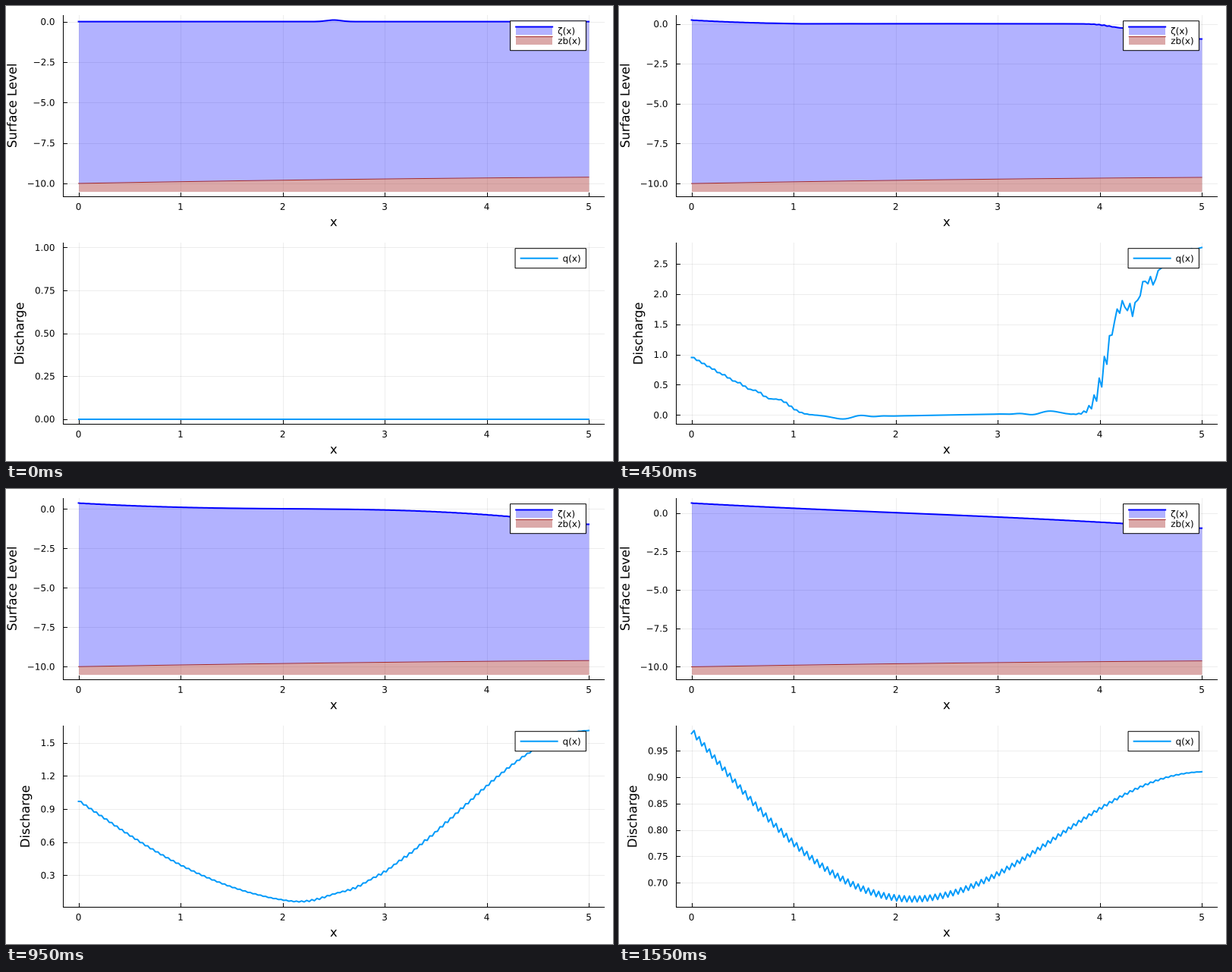
Write a matplotlib script that moves like this. It is 800 by 600 pixels and loops after 1.6 s.

```python
import numpy as np
import matplotlib.pyplot as plt
from matplotlib.animation import FuncAnimation
from matplotlib.patches import PathPatch, Rectangle
from matplotlib.textpath import TextPath
from matplotlib.transforms import Affine2D

W, H, DPI = 800, 600, 100
FRAMES, INTERVAL = 32, 50
PX = 72 / DPI             # points per pixel
SMALL, LARGE = 12, 16.5   # font sizes in pixels
MID = 4.4                 # half the height of a digit
BLUE, BROWN, SKY = "#0000ff", "#a52a2a", "#009afa"
LEFT, RIGHT, TOP, HEIGHT = 75.4, 788.2, 11.7, 239.7
KEY_RIGHT, KEY_TOP, KEY_ROW = 764.45, 19.7, 13

# Shallow water channel: inflow on the left, lowered level on the right
N, GRAVITY, FRICTION = 200, 9.81, 39.0
INFLOW, OUT_LEVEL, FLOOR = 1.0, -1.0, -10.5
SUBSTEPS = 4
x = np.linspace(0, 5, N)
dx = x[1] - x[0]


def bed_level(s):
    return -10 + 0.115 * s - 0.0076 * s ** 2


bed = bed_level(x)
bed_wide = bed_level(np.linspace(-dx, 5 + dx, N + 2))


def pad(a, left, right):
    out = np.empty(a.shape[:-1] + (N + 2,))
    out[..., 1:-1] = a
    out[..., 0], out[..., -1] = left, right
    return out


def diff(a):
    return (a[..., 2:] - a[..., :-2]) / (2 * dx)


def rates(y):
    z, q = y[..., :N], y[..., N:]
    zw = pad(z, z[..., 0], OUT_LEVEL)
    qw = pad(q, INFLOW, q[..., -1])
    depth = zw - bed_wide
    dq = -diff(qw ** 2 / depth) - GRAVITY * (z - bed) * diff(zw) - FRICTION * q
    return np.concatenate([-diff(qw), dq], axis=-1)


def advance(y, dt):
    """One step of a second order L-stable Rosenbrock method."""
    eye, eps, d = np.eye(2 * N), 1e-6, 1 / (2 + np.sqrt(2))
    f0 = rates(y)
    jac = (rates(y + eps * eye) - f0).T / eps
    inv = np.linalg.inv(eye - dt * d * jac)
    k1 = inv @ f0
    k2 = inv @ (rates(y + dt / 2 * k1) - k1) + k1
    return y + dt * k2


def simulate():
    # the time step grows as the waves die out
    knots = [0.5, 1.5, 2.5, 8.5, 13, 17, 23, 27, 31]
    sizes = [0.003, 0.009, 0.0135, 0.0148, 0.0153, 0.0228, 0.033, 0.0525, 0.157]
    mids = np.arange(FRAMES - 1) + 0.5
    steps = np.exp(np.interp(mids, knots, np.log(sizes)))
    y = np.concatenate([0.1 * np.exp(-((x - 2.5) / 0.1) ** 2), np.zeros(N)])
    states = [y]
    for dt in steps:
        for _ in range(SUBSTEPS):
            y = advance(y, dt / SUBSTEPS)
        states.append(y)
    return states


def padded(lo, hi):
    if hi - lo < 1e-12:
        hi = lo + 1
    margin = 0.03 * (hi - lo)
    return lo - margin, hi + margin


def nice_ticks(lo, hi):
    """Tick values and decimals, scored by count, coverage and niceness."""
    best, result = -1, ([], 0)
    span = hi - lo
    order = int(np.floor(np.log10(span)))
    for z in (order, order - 1):
        for base, nice in ((1, 1), (5, .9), (2.5, .5), (2, .7), (3, .2)):
            step = base * 10.0 ** z
            first, last = int(np.ceil(lo / step)), int(np.floor(hi / step))
            count = last - first + 1
            if not 4 <= count <= 8:
                continue
            score = (0.25 * (1 - abs(count - 5) / 5) + (first <= 0 <= last) / 6
                     + 0.5 * span / ((count - 1) * step) + 0.25 * nice)
            if score > best + 1e-9:
                decimals = max(0, -z + (base == 2.5))
                best = score
                result = [i * step for i in range(first, last + 1)], decimals
    return result


def to_x(v):
    return LEFT + (np.asarray(v) + 0.15) / 5.3 * (RIGHT - LEFT)


def line(xs, ys, color="black", width=1.0, z=1, **kw):
    ax.plot(xs, ys, color=color, lw=width * PX, zorder=z, **kw)


def text(px, py, s, size=SMALL, align=0.5, angle=0):
    """Draw s on the baseline py and return its width."""
    path = TextPath((0, 0), s, size=size)
    ink = path.get_extents()
    place = (Affine2D().translate(-ink.x0 - align * ink.width, 0)
             .rotate_deg(angle).scale(1, -1).translate(px, py))
    ax.add_patch(PathPatch(path, fc="black", lw=0, zorder=7,
                           transform=place + ax.transData))
    return ink.width


def panel(top, limits, name):
    """Draw grid, axes and labels; return the value-to-pixel map."""
    lo, hi = limits
    bottom = top + HEIGHT

    def to_y(v):
        return bottom - (np.asarray(v) - lo) / (hi - lo) * HEIGHT

    line([LEFT, LEFT], [top, bottom])
    line([LEFT, RIGHT], [bottom, bottom])
    for i in range(6):
        px = to_x(i)
        line([px, px], [top, bottom], alpha=0.07, z=0)
        line([px, px], [bottom, bottom - 5])
        text(px, bottom + 17.4, str(i))
    ticks, decimals = nice_ticks(lo, hi)
    widest = 0
    for v in ticks:
        py = to_y(v)
        label = f"{v:.{decimals}f}".replace("-", "\u2212")
        line([LEFT, RIGHT], [py, py], alpha=0.07, z=0)
        line([LEFT, LEFT + 5], [py, py])
        widest = max(widest, text(63.7, py + MID, label, align=1))
    text((LEFT + RIGHT) / 2, bottom + 38.8, "x", LARGE)
    text(48.4 - widest, top + HEIGHT / 2, name, LARGE, angle=90)
    return to_y


def box(x0, y0, w, h, z, **kw):
    ax.add_patch(Rectangle((x0, y0), w, h, zorder=z, **kw))


def legend(top, width, rows):
    """Rows hold label, line colour, line width and fill opacity."""
    left = KEY_RIGHT - width
    box(left, top, width, KEY_ROW * (len(rows) + 1), 4,
        fc="white", ec="black", lw=PX, snap=False)
    x0, x1 = left + 7.6, left + 55.6
    for i, (label, color, thick, opacity) in enumerate(rows, 1):
        py = top + i * KEY_ROW
        rise = 5.2 if opacity else 0
        box(x0, py - rise, x1 - x0, 2 * rise, 5, fc=color, alpha=opacity, lw=0)
        line([x0, x1], [py - rise, py - rise], color, thick, 6, snap=False)
        text(left + 63.2, py + MID, label, align=0)


def draw(i):
    ax.clear()
    ax.set(xlim=(0, W), ylim=(H, 0))
    ax.axis("off")
    level, flow = states[i][:N], states[i][N:]
    px = to_x(x)

    to_y = panel(TOP, padded(FLOOR, level.max()), "Surface Level")
    surface, ground = to_y(level), to_y(bed)
    ax.fill_between(px, surface, ground, color=BLUE, alpha=0.3, lw=0, zorder=2)
    ax.fill_between(px, ground, to_y(FLOOR), color=BROWN, alpha=0.4, lw=0, zorder=2)
    line(px, surface, BLUE, 2, 3)
    line(px, ground, BROWN, 1, 3)
    legend(KEY_TOP, 99.9, [("\u03b6(x)", BLUE, 2, 0.3), ("zb(x)", BROWN, 1, 0.4)])

    to_y = panel(TOP + 300, padded(flow.min(), flow.max()), "Discharge")
    line(px, to_y(flow), SKY, 2, 3)
    legend(KEY_TOP + 300, 93.4, [("q(x)", SKY, 2, 0)])


states = simulate()
fig = plt.figure(figsize=(W / DPI, H / DPI), dpi=DPI, facecolor="white")
ax = fig.add_axes([0, 0, 1, 1])
anim = FuncAnimation(fig, draw, frames=FRAMES, init_func=lambda: None,
                     interval=INTERVAL, repeat=True, repeat_delay=0)
plt.show()
```
